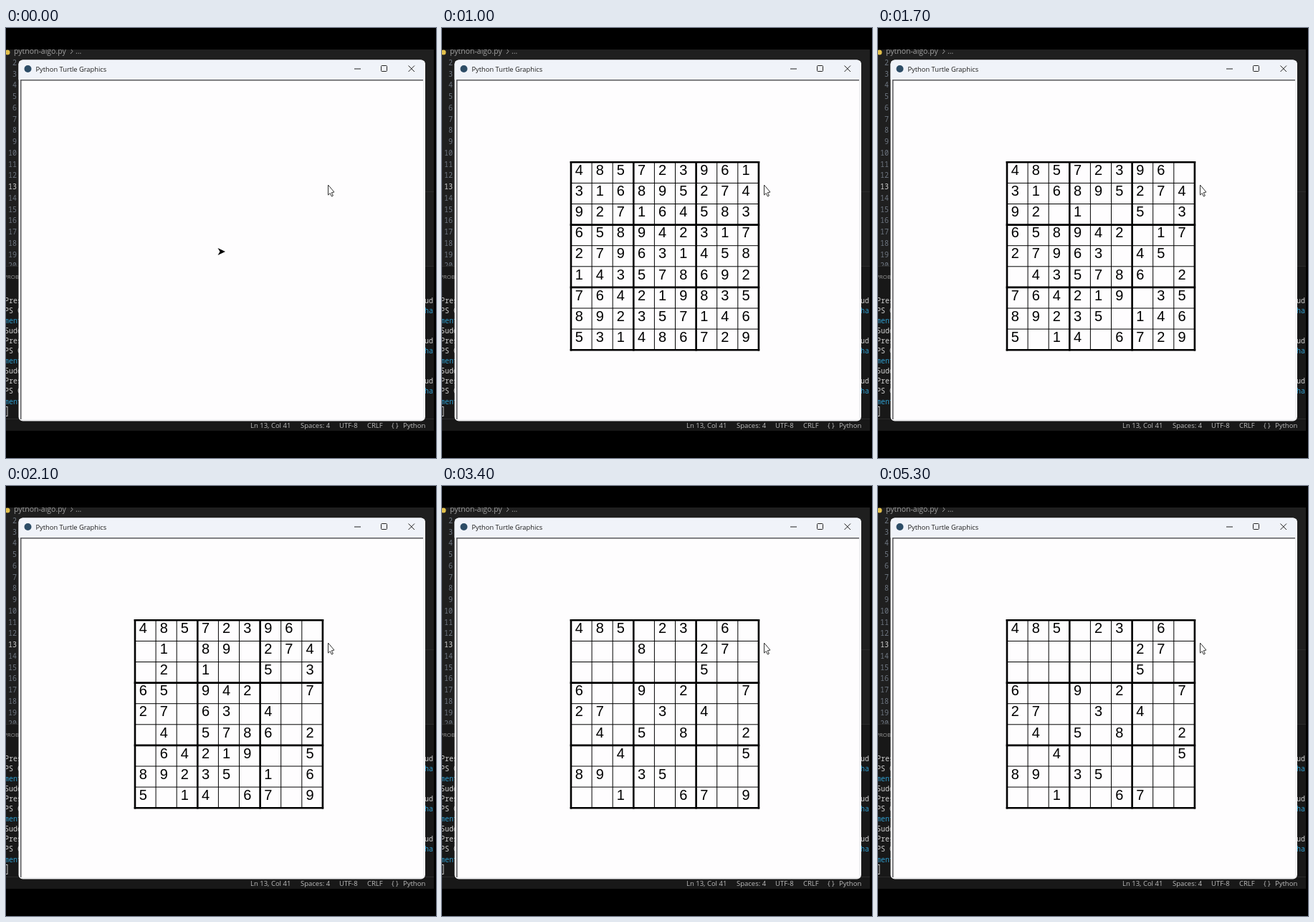
An HTML page with a canvas that plays this animation: 600x600 px, repeating every 5600 ms.

```html
<!DOCTYPE html>
<html lang="en">
<head>
<meta charset="utf-8">
<title>Sudoku generator</title>
<style>
html, body { margin: 0; width: 100%; height: 100%; overflow: hidden; background: #000; }
canvas { display: block; }
</style>
</head>
<body>
<canvas id="stage" width="600" height="600"></canvas>
<script>
const ctx = document.getElementById('stage').getContext('2d');
const LOOP = 5600, STEP = 100, GRID_AT = 300;
const LEFT = 180, TOP = 187.3, CELL = 29.1;
const UI = '"Open Sans", sans-serif', MONO = '"Noto Sans Mono", monospace';
const ARIAL = '"Liberation Sans", Arial, sans-serif';

const solution = ['485723961', '316895274', '927164583', '658942317', '279631458',
  '143578692', '764219835', '892357146', '531486729'].join('');
// The phase in which each digit is cleared; a dot stays.
const phases = ['...b..b.a', 'bcbdcb..b', 'bcabaa.ab', '.bb.b.ab.', '..bb.a.ba',
  'a.b.b.ba.', 'bb.bbbab.', '..c..abbc', 'ca.ba..be'].join('');
const spans = { a: [1250, 1700], b: [1700, 2580], c: [2600, 3380], d: [3400, 3900], e: [4300, 4900] };

const clearAt = Array(81).fill(Infinity);
for (const [phase, [start, end]] of Object.entries(spans)) {
  const cells = [...phases].map((p, i) => p === phase ? i : -1).filter(i => i >= 0);
  cells.sort((a, b) => (a * 37 + 11) % 83 - (b * 37 + 11) % 83);
  cells.forEach((cell, k) => clearAt[cell] = start + (end - start) * (k + 1) / cells.length);
}

function rect(x, y, w, h, color) {
  ctx.fillStyle = color;
  ctx.fillRect(x, y, w, h);
}

function text(str, x, baseline, size, color, family = UI, align = 'left') {
  ctx.font = `${size}px ${family}`;
  ctx.textAlign = align;
  ctx.fillStyle = color;
  ctx.fillText(str, x, baseline);
}

function dot(x, y, r, color) {
  ctx.fillStyle = color;
  ctx.beginPath();
  ctx.arc(x, y, r, 0, 7);
  ctx.fill();
}

function polygon(points, fill, stroke) {
  ctx.beginPath();
  points.forEach(([x, y]) => ctx.lineTo(x, y));
  ctx.closePath();
  ctx.fillStyle = fill;
  ctx.fill();
  if (stroke) {
    ctx.strokeStyle = stroke;
    ctx.stroke();
  }
}

function line(x1, y1, x2, y2, width = 1, color = '#000') {
  ctx.strokeStyle = color;
  ctx.lineWidth = width;
  ctx.beginPath();
  ctx.moveTo(x1, y1);
  ctx.lineTo(x2, y2);
  ctx.stroke();
}

function drawEditor() {
  rect(0, 0, 600, 600, '#000');
  ctx.save();
  ctx.beginPath();
  ctx.rect(0, 30, 597, 532);
  ctx.clip();
  rect(0, 30, 597, 303, '#1f1f1f');
  rect(0, 332, 597, 230, '#181818');
  dot(2, 34, 3.5, '#e3c04a');
  text('python-algo.py', 11, 36, 10.5, '#a0a0a0');
  line(90, 29, 93, 32.5, 1, '#a0a0a0');
  line(93, 32.5, 90, 36, 1, '#a0a0a0');
  text('...', 97, 36, 10.5, '#a0a0a0');
  rect(585, 228, 12, 1, '#2b2b2b');

  ctx.save();
  ctx.beginPath();
  ctx.rect(0, 30, 20, 302);
  ctx.clip();
  for (let n = 2; n <= 20; n++) {
    text(n, 15, 51.8 + (n - 2) * 15.75, 10, n === 13 ? '#d0d0d0' : '#6e7681', MONO, 'right');
  }
  ctx.restore();

  rect(0, 332, 597, 1, '#2b2b2b');
  text('PROBLEMS', -3, 350, 8, '#9a9a9a');
  const left = ['Pres', 'PS C', 'ment', 'Sudo'], right = ['ud', 'ha'];
  for (let row = 0; row < 11; row++) {
    const y = 383.5 + row * 14.1, kind = row % 4;
    text(left[kind], -2, y, 10, kind === 2 ? '#2f9fd0' : '#d0d0d0', MONO);
    if (right[kind]) text(right[kind], 584, y, 10, kind ? '#2f9fd0' : '#d0d0d0', MONO);
  }
  ctx.strokeStyle = '#c8c8c8';
  ctx.lineWidth = 1;
  ctx.strokeRect(-3.5, 528.5, 5.5, 13);

  rect(0, 545, 597, 1, '#2b2b2b');
  [['Ln 13, Col 41', 341], ['Spaces: 4', 411], ['UTF-8', 465], ['CRLF', 504], ['{ }', 538], ['Python', 554]]
    .forEach(([label, x]) => text(label, x, 557.5, 9.5, '#bdbdbd'));
  ctx.restore();
}

function drawWindow() {
  ctx.fillStyle = '#f0f0f2';
  ctx.beginPath();
  ctx.roundRect(17.5, 44.5, 567.5, 504, 6);
  ctx.fill();
  ctx.save();
  ctx.clip();
  rect(17, 44, 568, 28, '#f0f3f9');
  ctx.restore();
  rect(20, 72, 562, 474, '#58585c');
  rect(21.5, 73.5, 560.5, 472.5, '#fefdfe');
  dot(30.5, 57, 5, '#2c4c66');
  text('Python Turtle Graphics', 41.5, 60.5, 9.3, '#1b1b1b');
  line(486, 57, 495, 57, 1, '#222');
  ctx.beginPath();
  ctx.roundRect(523.5, 52.5, 8, 8, 1);
  ctx.stroke();
  line(561.5, 52.5, 570, 61, 1, '#222');
  line(570, 52.5, 561.5, 61, 1, '#222');
}

function drawSudoku(t) {
  ctx.lineCap = 'square';
  for (let i = 0; i <= 9; i++) {
    const d = i * CELL, size = 9 * CELL, width = i % 3 ? 1 : 2.6;
    line(LEFT + d, TOP, LEFT + d, TOP + size, width);
    line(LEFT, TOP + d, LEFT + size, TOP + d, width);
  }
  ctx.lineCap = 'butt';
  clearAt.forEach((end, i) => {
    if (t >= end) return;
    text(solution[i], 191.2 + i % 9 * CELL, 205 + Math.floor(i / 9) * CELL, 20, '#000', ARIAL, 'center');
  });
}

function draw(t) {
  drawEditor();
  drawWindow();
  if (t < GRID_AT) polygon([[306, 312], [295.5, 307], [298.5, 312], [295.5, 317]], '#000');
  else drawSudoku(t);
  ctx.lineWidth = 1;
  polygon([[449.5, 219], [449.5, 233], [452.3, 230.5], [454.4, 235], [456.4, 234], [454.3, 229.6], [458, 229]],
    '#fff', '#333');
}

const start = performance.now();
function tick() {
  const t = (performance.now() - start) % LOOP;
  draw(Math.floor(t / STEP) * STEP);
  requestAnimationFrame(tick);
}
tick();
</script>
</body>
</html>
```
